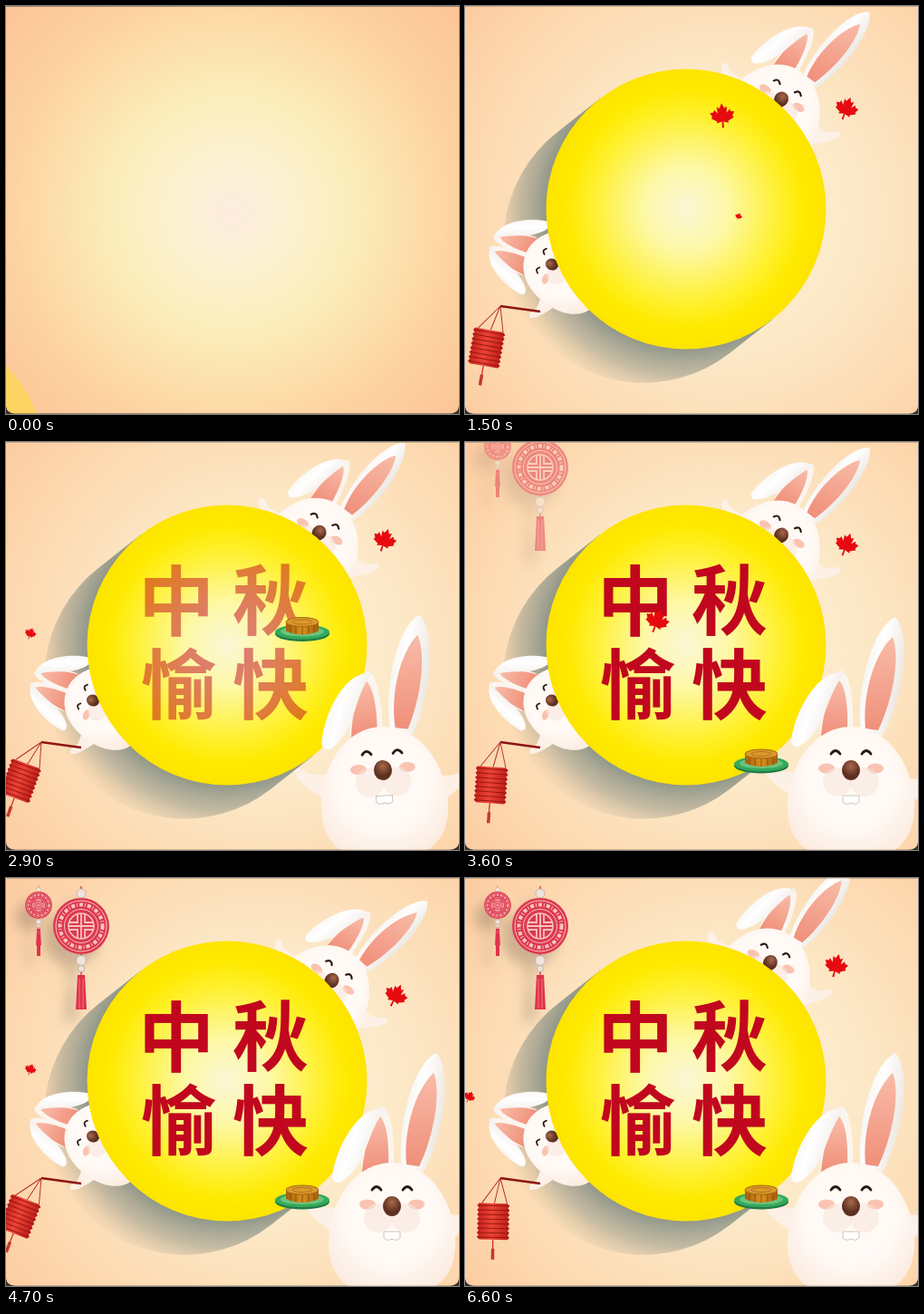
Animation, 500 px wide and 450 px high, one loop 6.7 s. Source, as an HTML page:

```html
<!DOCTYPE html>
<html lang="zh">
<head>
<meta charset="utf-8">
<style>
html, body { margin: 0; width: 100%; height: 100%; overflow: hidden; background: #3a332b; }
svg { display: block; width: 100vw; height: 100vh; }
text { font: 700 84px "Noto Sans CJK SC", "Noto Sans CJK", sans-serif; fill: #c1071e; text-anchor: middle; }
</style>
</head>
<body>
<svg viewBox="0 0 500 450" preserveAspectRatio="none">
<defs>
  <radialGradient id="warm" gradientUnits="userSpaceOnUse" cx="250" cy="228" r="340">
    <stop offset="0" stop-color="#fcecdf"/><stop offset=".2" stop-color="#fcf1cf"/>
    <stop offset=".4" stop-color="#fbedb9"/><stop offset=".72" stop-color="#fdd3a0"/>
    <stop offset="1" stop-color="#fcc397"/>
  </radialGradient>
  <radialGradient id="pale" gradientUnits="userSpaceOnUse" cx="285" cy="230" r="370">
    <stop offset="0" stop-color="#fcf2d8"/><stop offset=".4" stop-color="#fce9c8"/>
    <stop offset=".75" stop-color="#fdd9b0"/><stop offset="1" stop-color="#fdcba0"/>
  </radialGradient>
  <radialGradient id="glow">
    <stop offset="0" stop-color="#fbf7d6"/><stop offset=".3" stop-color="#fdf8a6"/>
    <stop offset=".68" stop-color="#fff02c"/><stop offset=".85" stop-color="#ffea00"/>
    <stop offset="1" stop-color="#fde400"/>
  </radialGradient>
  <radialGradient id="dusk" gradientUnits="userSpaceOnUse" cx="244" cy="224" r="216">
    <stop offset=".7" stop-color="#6f7f78" stop-opacity=".8"/>
    <stop offset=".85" stop-color="#8d9184" stop-opacity=".5"/>
    <stop offset="1" stop-color="#b8a88c" stop-opacity="0"/>
  </radialGradient>
  <radialGradient id="fur" cy=".4" r=".62">
    <stop offset=".55" stop-color="#fffaf6"/><stop offset="1" stop-color="#fcebe0"/>
  </radialGradient>
  <linearGradient id="flap" x1="0" y1="0" x2="1" y2=".5">
    <stop offset="0" stop-color="#eeeae4"/><stop offset=".5" stop-color="#fff"/>
    <stop offset="1" stop-color="#ece6df"/>
  </linearGradient>
  <linearGradient id="pink" x1="0" y1="0" x2="0" y2="1">
    <stop offset="0" stop-color="#f8bca8"/><stop offset="1" stop-color="#f08f7a"/>
  </linearGradient>
  <radialGradient id="snout" cy=".3"><stop offset="0" stop-color="#a9694c"/><stop offset="1" stop-color="#5d2f20"/></radialGradient>
  <linearGradient id="paper" x1="0" x2="1">
    <stop offset="0" stop-color="#c3201c"/><stop offset=".45" stop-color="#ee4436"/><stop offset="1" stop-color="#bd1c18"/>
  </linearGradient>
  <linearGradient id="crust" x1="0" x2="1">
    <stop offset="0" stop-color="#a8600c"/><stop offset=".5" stop-color="#d8901e"/><stop offset="1" stop-color="#a8600c"/>
  </linearGradient>
  <filter id="soft" x="-100%" y="-50%" width="300%" height="250%">
    <feDropShadow dx="-11" dy="13" stdDeviation="7" flood-color="#7d6a58" flood-opacity=".38"/>
  </filter>
  <clipPath id="card"><path d="M0 .6H500V441Q499 449.500 490 449.500H10Q1 449.500 0 441Z"/></clipPath>

  <path id="leaf" fill="#e60a10"/>
  <path id="arm" fill="#fdf0e6" d="M-56 36C-74 22 -92 12 -98 -3C-94 -11 -88 -5 -82 0C-72 3 -64 0 -54 2Z"/>
  <g id="floppy">
    <path fill="#fbf5ef" d="M2 -42C3 -75 0 -104 -10 -110C-24 -105 -34 -70 -34 -40Z"/>
    <path fill="url(#pink)" d="M-4 -45C-3 -70 -6 -92 -13 -99C-24 -88 -31 -62 -33 -38Z"/>
    <path fill="url(#flap)" d="M-7 -108C-36 -112 -62 -66 -66 -32C-62 -17 -44 -34 -35 -50C-25 -70 -22 -88 -7 -108Z"/>
  </g>
  <g id="pointed">
    <path fill="url(#flap)" d="M11 -42C5 -80 20 -155 49 -169C66 -150 60 -85 35 -38Z"/>
    <path fill="url(#pink)" d="M16 -46C12 -85 27 -130 46 -147C54 -128 48 -82 30 -44Z"/>
  </g>
  <g id="half">
    <path fill="none" stroke="#2b1a14" stroke-width="2.800" stroke-linecap="round" d="M-22 -18q5 -7 10 0"/>
    <ellipse cx="-27" cy="-2" rx="9" ry="5.500" fill="#f8b09a" opacity=".75"/>
    <circle cx="-15" cy="13" r="16" fill="#f6e6da" opacity=".55"/>
  </g>
  <g id="face">
    <use href="#arm"/><use href="#arm" transform="translate(0 8) scale(-1 1)"/>
    <path fill="url(#fur)" d="M0 -48C44 -48 70 0 70 40C70 85 40 100 0 100S-70 85 -70 40C-70 0 -44 -48 0 -48Z"/>
    <use href="#half"/><use href="#half" transform="scale(-1 1)"/>
    <path fill="#fff" stroke="#cfc4ba" d="M-9 28h18v7q-4 4 -9 1q-5 3 -9 -1z"/>
    <ellipse rx="10" ry="11" fill="url(#snout)"/>
  </g>
  <g id="rabbit"><use href="#floppy"/><use href="#pointed"/><use href="#face"/></g>
  <g id="droopy"><use href="#floppy"/><use href="#floppy" transform="scale(-1 1)"/><use href="#face"/></g>

  <g id="knot">
    <path d="M0 -44V55" stroke="#d6455c" stroke-width="1.500"/>
    <circle r="31" fill="#dd3850"/>
    <g fill="none" stroke="#f9c4bd">
      <circle r="28"/>
      <circle r="23.500" stroke-width="4" stroke-dasharray="4 2 1 2"/>
      <circle r="18.500"/>
      <path stroke-width="1.800" d="M0 -14V14M-14 0H14M-13 -4H-4V-13M13 -4H4V-13M-13 4H-4V13M13 4H4V13"/>
      <circle r="14" stroke-width="1.500"/>
    </g>
    <g fill="#efe3dc" stroke="#b9a7a0" stroke-width=".8">
      <circle cy="-36" r="5"/><circle cy="38" r="5.500"/><circle cy="47" r="3.500"/>
    </g>
    <path fill="#e0304a" d="M-4 54H4L6 92H-6Z"/>
    <path stroke="#f58a94" stroke-width=".8" d="M-2 58V91M2 58V91"/>
  </g>
</defs>

<g clip-path="url(#card)">
  <rect width="500" height="450" fill="url(#warm)"/>
  <rect id="day" width="500" height="450" fill="url(#pale)"/>
  <path id="shade" fill="url(#dusk)" d="M149 102L102 139A154 154 0 0 0 292 383L339 346Z"/>
  <g id="sway">
    <g id="peek">
      <use href="#rabbit" transform="translate(349 103) rotate(29) scale(.78)"/>
      <use href="#leaf" transform="translate(421 113) rotate(20) scale(13)"/>
    </g>
  </g>
  <g id="side">
    <use href="#droopy" transform="translate(96 285) rotate(-70) scale(.65)"/>
    <path d="M39 331L83 337" stroke="#8e1414" stroke-width="2.400"/>
    <g id="lantern">
      <path fill="none" stroke="#b8322a" d="M0 0L-20 28M0 0L8 28M0 0L-6 28"/>
      <g transform="translate(-7 48)">
        <path id="folds" fill="url(#paper)"/>
        <path id="ribs" fill="none" stroke="#8f1512" stroke-width=".9"/>
        <path d="M0 20V31" stroke="#c22" stroke-width="1.200"/>
        <path d="M0 30V42" stroke="#c43a2c" stroke-width="3.500"/>
      </g>
    </g>
  </g>
  <circle id="moon" r="154.500" fill="url(#glow)"/>
  <g id="words">
    <text x="188" y="207">中</text><text x="292" y="206">秋</text>
    <text x="191" y="299">愉</text><text x="292" y="299">快</text>
  </g>
  <g id="knots" filter="url(#soft)">
    <use href="#knot" transform="translate(83 53)"/>
    <use href="#knot" transform="translate(36 30) scale(.47 .62)" visibility="hidden"/>
    <use href="#knot" transform="translate(36 30) scale(.48)"/>
    <path d="M36 62V86" stroke="#e0304a" stroke-width="4"/>
  </g>
  <g id="big"><use href="#rabbit"/></g>
  <g id="cake">
    <ellipse cy="6" rx="30" ry="8.500" fill="#1f7c46"/>
    <ellipse cy="4" rx="30" ry="8" fill="#35a95c"/>
    <ellipse cy="3.500" rx="24" ry="5.500" fill="#6cc47c"/>
    <path fill="url(#crust)" d="M-18 -7V3Q0 11 18 3V-7Z"/>
    <path stroke="#8a4c08" d="M-13 -4V5M-7 -3V6M0 -2V7M7 -3V6M13 -4V5"/>
    <ellipse cy="-7" rx="18" ry="5" fill="#dc9a2c" stroke="#a8680f"/>
    <ellipse cy="-7" rx="11" ry="2.500" fill="none" stroke="#b4761a"/>
  </g>
  <g id="drift"></g>
</g>
</svg>
<script>
const LOOP = 6700, CYCLE = 1800;
const $ = id => document.getElementById(id);
const set = (el, name, value) => el.setAttribute(name, value);
const fade = (id, v) => set($(id), 'opacity', v);
const place = (id, v) => set($(id), 'transform', v);

// Eased value through pairs of time and value.
function key(t, ...k) {
  if (t <= k[0]) return k[1];
  for (let i = 2; i < k.length; i += 2) {
    if (t < k[i]) {
      const u = (t - k[i - 2]) / (k[i] - k[i - 2]);
      return k[i - 1] + (k[i + 1] - k[i - 1]) * u * u * (3 - 2 * u);
    }
  }
  return k[k.length - 1];
}

const edge = [[0, -1], [.2, -.6], [.42, -.72], [.36, -.2], [.64, -.5], [.72, -.3], [1, -.26],
  [.82, .06], [.92, .2], [.45, .46], [.5, .62], [.06, .5], [.08, 1]];
const mirror = edge.slice(1).reverse().map(([x, y]) => [-x, y]);
set($('leaf'), 'd', 'M' + [...edge, ...mirror].join('L') + 'Z');

// Pleated sides of the paper lantern.
let folds = 'M-15 -20H15', ribs = '';
for (let y = -20; y < 20; y += 5) {
  folds += `L18 ${y + 2.5}L16 ${y + 5}`;
  ribs += `M-17 ${y + 2.5}H17`;
}
folds += 'H-15';
for (let y = 20; y > -20; y -= 5) folds += `L-18 ${y - 2.5}L-16 ${y - 5}`;
set($('folds'), 'd', folds + 'Z');
set($('ribs'), 'd', ribs);

// Falling leaves: moment, x, y, size, speed x and y per ms, shown before and after.
const leaves = [
  [0, 212, 197, 13.5, -.24, .29, 550, 480],
  [1100, 27, 211, 6.5, -.22, .29, 220, 300],
  [1500, 302, 232, 4, -.21, .22, 150, 180],
  [200, 196, 343, 6.5, -.2, .25, 130, 300],
  [200, 299, 320, 4, -.2, .25, 130, 300],
  [200, 265, 108, 2.8, -.2, .25, 100, 300]
].map(data => {
  const el = document.createElementNS('http://www.w3.org/2000/svg', 'use');
  set(el, 'href', '#leaf');
  $('drift').append(el);
  return { el, data };
});

function drawLeaves(t) {
  for (const { el, data: [at, x, y, size, vx, vy, before, after] } of leaves) {
    const d = ((t - at) % CYCLE + CYCLE * 1.5) % CYCLE - CYCLE / 2;
    const shown = t > 1200 && d > -before && d < after;
    set(el, 'visibility', shown ? 'visible' : 'hidden');
    const fall = vy * d + .00012 * d * d;
    set(el, 'transform', `translate(${x + vx * d} ${y + fall}) rotate(${20 + d * .08}) scale(${size})`);
  }
}

function draw(t) {
  fade('day', key(t, 0, 0, 900, 1));
  fade('shade', key(t, 600, 0, 1000, 1));

  const arrive = key(t, -200, 0, 800, 1) - key(0, -200, 0, 800, 1);
  const u = arrive / (1 - key(0, -200, 0, 800, 1));
  place('moon', `translate(${-110 + 354 * u} ${505 - 281 * u})`);
  fade('moon', key(t, -300, 0, 600, 1) + .1);

  const out = key(t, 800, 1, 1400, 0);
  fade('sway', t < 800 ? 0 : 1);
  place('peek', `translate(${-110 * out} ${125 * out})`);
  place('sway', `rotate(${key(t, 1500, 0, 2900, -1.6, 3600, 0, 4700, 5.2, 5600, .2, 6600, -5.5)} 244 224)`);

  const left = key(t, 850, 1, 1450, 0);
  fade('side', t < 850 ? 0 : 1);
  place('side', `translate(${140 * left} ${-60 * left})`);
  place('lantern', `translate(39 331) rotate(${key(t, 1500, 10, 2200, 0, 2900, 20, 3600, 4, 4700, 21, 5600, 8, 6600, 1)})`);

  const rise = key(t, 2100, 300, 2750, 0);
  const lean = key(t, 2900, 1, 3300, 0);
  fade('big', t < 2100 ? 0 : 1);
  place('big', `translate(${426 - 10 * lean} ${362 + rise}) rotate(${-3 * lean})`);

  fade('words', key(t, 2500, 0, 3300, 1));
  fade('cake', key(t, 2500, 0, 2700, 1));
  place('cake', `translate(327 ${key(t, 2500, 60, 3300, 351)})`);

  fade('knots', key(t, 3300, 0, 3900, 1));
  place('knots', `translate(0 ${key(t, 3300, -50, 3900, 0)})`);

  drawLeaves(t);
}

const start = performance.now();
function frame() {
  const t = (performance.now() - start) % LOOP;
  draw(Math.floor(t / 100) * 100);
  requestAnimationFrame(frame);
}
draw(0);
requestAnimationFrame(frame);
</script>
</body>
</html>
```
